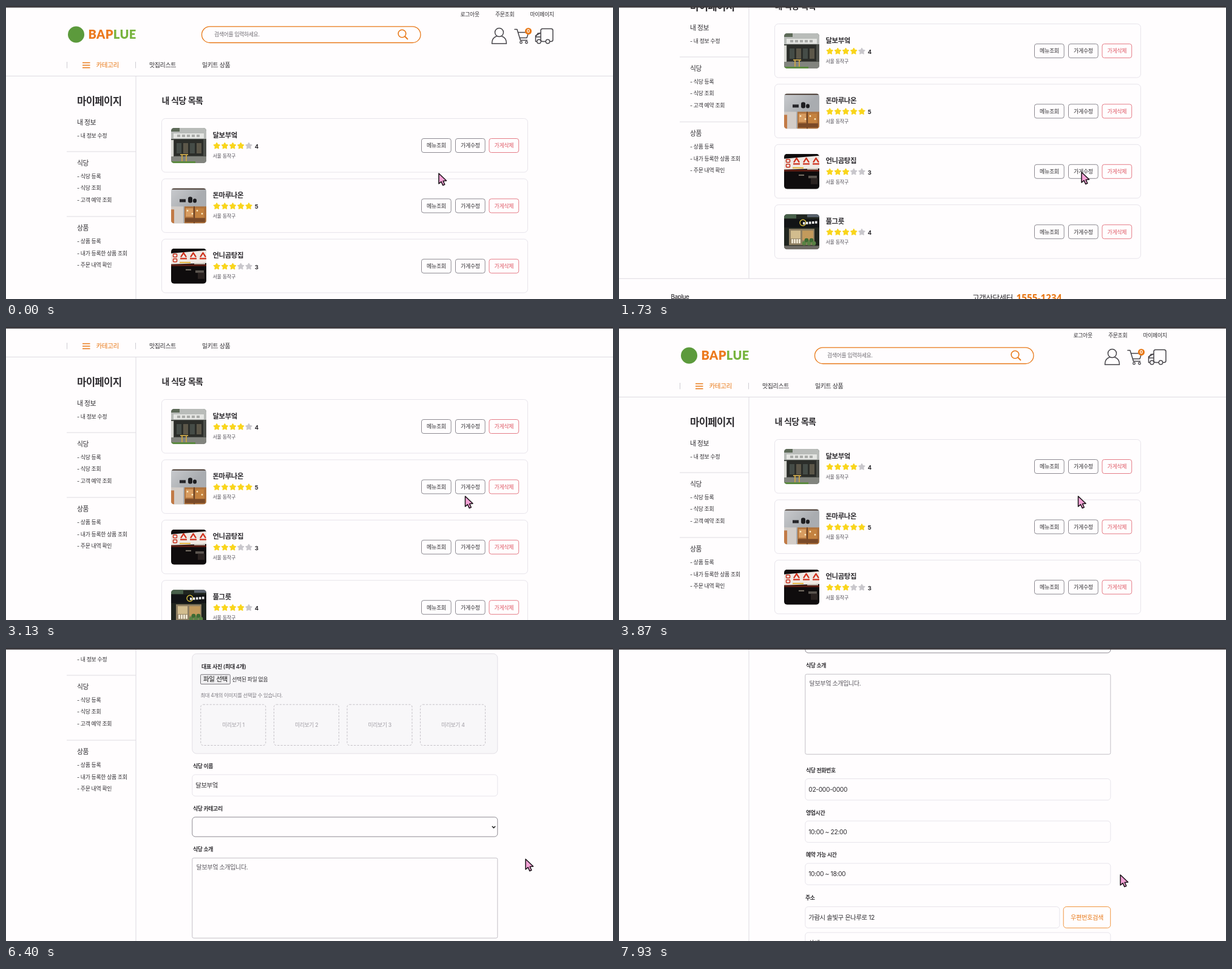
These frames come from a looping animation (1000 by 483 pixels, 8000 ms). An HTML page with a canvas:

```html
<!DOCTYPE html>
<html lang="ko">
<head>
<meta charset="utf-8">
<title>마이페이지</title>
<style>
  html, body { margin: 0; width: 100%; height: 100%; overflow: hidden; background: #fffdfe; }
  canvas { display: block; width: 100vw; height: 100vh; }
</style>
</head>
<body>
<canvas id="stage"></canvas>
<script>
const W = 1000, H = 483, LOOP = 8000, SWITCH = 5260;
const INK = '#2f2d31', ORANGE = '#e87817', RED = '#de5562', LINE = '#dddbe1', PALE = '#e7e4eb';
const EDGE = '#8d8a92', PAPER = '#fffdfe';
const FONT = 'Inter, "Noto Sans CJK KR", "Noto Sans CJK", sans-serif';

const canvas = document.getElementById('stage');
const ratio = window.devicePixelRatio || 1;
canvas.width = W * ratio;
canvas.height = H * ratio;
const c = canvas.getContext('2d');

// --- drawing helpers; y of a text is its optical centre ---
function text(s, x, y, size, color = INK, weight = 400, align = 'left') {
  c.font = `${weight} ${size}px ${FONT}`;
  c.letterSpacing = -0.04 * size + 'px';
  c.textAlign = align;
  c.fillStyle = color;
  c.fillText(s, x, y + size * 0.36);
}

function box(x, y, w, h, r, stroke, fill, lw = 1) {
  c.beginPath();
  c.roundRect(x, y, w, h, r);
  if (fill) { c.fillStyle = fill; c.fill(); }
  if (stroke) { c.strokeStyle = stroke; c.lineWidth = lw; c.stroke(); }
}

function line(points, color = LINE, lw = 1) {
  c.beginPath();
  points.forEach(([x, y], i) => i ? c.lineTo(x, y) : c.moveTo(x, y));
  c.strokeStyle = color;
  c.lineWidth = lw;
  c.stroke();
}

function rect(color, x, y, w, h) {
  c.fillStyle = color;
  c.fillRect(x, y, w, h);
}

function disc(x, y, r, fill, stroke, lw = 1) {
  c.beginPath();
  c.arc(x, y, r, 0, Math.PI * 2);
  if (fill) { c.fillStyle = fill; c.fill(); }
  if (stroke) { c.strokeStyle = stroke; c.lineWidth = lw; c.stroke(); }
}

function star(x, y, r, color) {
  c.beginPath();
  for (let i = 0; i < 10; i++) {
    const a = -Math.PI / 2 + i * Math.PI / 5, d = i % 2 ? r * 0.54 : r;
    c.lineTo(x + d * Math.cos(a), y + d * Math.sin(a));
  }
  c.closePath();
  c.fillStyle = c.strokeStyle = color;
  c.lineWidth = 1;
  c.lineJoin = 'round';
  c.fill();
  c.stroke();
}

// --- header ---
function icons() {
  const g = '#454348';
  c.lineCap = c.lineJoin = 'round';
  disc(812.5, 43.5, 7, null, g, 1.5);
  c.beginPath();
  c.moveTo(808, 50);
  c.bezierCurveTo(802, 52, 800.5, 57, 800.5, 62);
  c.lineTo(824.5, 62);
  c.bezierCurveTo(824.5, 57, 823, 52, 817, 50);
  c.stroke();

  line([[838, 38.5], [842, 38.5], [847.5, 56.5], [858.5, 56.5]], g, 1.5);
  line([[843.5, 43.5], [861, 43.5], [858, 52.5], [846.5, 52.5]], g, 1.5);
  disc(848.5, 60, 1.8, null, g, 1.3);
  disc(857.5, 60, 1.8, null, g, 1.3);
  disc(860.5, 41.5, 5.5, ORANGE);
  text('0', 860.4, 41.6, 8, '#fff', 700, 'center');

  line([[875, 58.5], [872.5, 58.5], [872.5, 49], [880, 44.5], [881, 44.5]], g, 1.5);
  box(881, 37.5, 20, 21, 3, g, PAPER, 1.5);
  line([[880.5, 45], [876, 45], [872.5, 51], [880.5, 51]], g, 1.3);
  disc(878, 58.5, 3.2, PAPER, g, 1.4);
  disc(892.5, 58.5, 3.2, PAPER, g, 1.4);
  c.lineCap = 'butt';
}

function header() {
  text('로그아웃', 748.5, 14, 8.9, INK, 500);
  text('주문조회', 806, 14, 8.9);
  text('마이페이지', 863.5, 14, 8.9);

  disc(115.5, 47, 13.5, '#5c9a3c');
  c.font = '900 20px Lato, "Open Sans", sans-serif';
  c.letterSpacing = '0.4px';
  c.textAlign = 'left';
  c.fillStyle = '#ec7a1e';
  c.fillText('BAP', 135.5, 54);
  const w = c.measureText('BAP').width;
  c.fillStyle = '#78b43e';
  c.fillText('LUE', 135.5 + w, 54);

  box(322.5, 33.8, 360.5, 26.7, 13.4, ORANGE, PAPER, 1.3);
  text('검색어를 입력하세요.', 343, 47, 8.9, '#6d6a70');
  disc(652.5, 45.5, 6.3, null, ORANGE, 1.6);
  line([[657, 50], [662, 55]], ORANGE, 1.8);
  icons();

  for (const x of [100.5, 213.5]) line([[x, 92], [x, 102.5]], '#cfccd2');
  for (const y of [93.5, 97.6, 101.7]) line([[126, y], [138.5, y]], ORANGE, 1.5);
  text('카테고리', 148.5, 97, 10.6, ORANGE, 500);
  text('맛집리스트', 236, 97, 10, INK, 500);
  text('밀키트 상품', 323, 97, 10, INK, 500);
  line([[0, 115.5], [W, 115.5]]);
}

// --- sidebar ---
const menu = [
  [192, '내 정보', '내 정보 수정'],
  [259, '식당', '식당 등록', '식당 조회', '고객 예약 조회'],
  [366.5, '상품', '상품 등록', '내가 등록한 상품 조회', '주문 내역 확인']
];

function sidebar(bottom) {
  line([[214, 115.5], [214, bottom]]);
  text('마이페이지', 117, 157, 16.7, INK, 600);
  for (const [y, head, ...items] of menu) {
    text(head, 117, y, 10.8, INK, 500);
    items.forEach((s, i) => text('- ' + s, 117, y + 21.3 + i * 19.7, 8.9));
  }
  for (const y of [240, 347]) line([[100, y], [214, y]]);
}

// --- shop photos, 58 by 58, as flat shapes ---
function photoArcade() {
  rect('#4c4f4a', 0, 0, 58, 58);
  rect('#b9bcb9', 0, 0, 58, 18);
  rect('#5d6a58', 0, 0, 14, 6);
  rect('#e4e5e2', 4, 9, 50, 8);
  for (let i = 0; i < 5; i++) rect('#a9aba8', 10 + i * 8, 11, 5, 4);
  rect('#2b2d29', 5, 19, 48, 27);
  for (let i = 0; i < 4; i++) rect(i % 2 ? '#5c5749' : '#454c47', 9 + i * 11, 25, 8, 17);
  rect('#d8d8d2', 0, 20, 4, 28);
  rect('#82847e', 0, 47, 58, 11);
  rect('#c3a14a', 15, 43, 13, 2);
  rect('#c3a14a', 17, 45, 2, 10);
  rect('#c3a14a', 24, 45, 2, 10);
  rect('#5b8a3f', 0, 55, 40, 3);
}

function photoWindow() {
  const wall = c.createLinearGradient(0, 0, 30, 30);
  wall.addColorStop(0, '#c9cbce');
  wall.addColorStop(1, '#a9acb0');
  rect(wall, 0, 0, 58, 58);
  rect('#3a2a20', 0, 0, 58, 2);
  rect('#26262a', 14, 18, 10, 5);
  box(28, 14, 7, 10, 3, null, '#1d1d20');
  box(36, 17, 6, 7, 3, null, '#1d1d20');
  rect('#b0733c', 22, 30, 36, 28);
  rect('#d89c60', 24, 33, 12, 14);
  rect('#c4823f', 40, 33, 14, 18);
  rect('#6d4426', 37, 30, 2, 28);
  rect('#7a4a28', 23, 49, 33, 7);
  for (let i = 0; i < 4; i++) disc(27 + i * 8, 37 + i % 2 * 5, 1.3, '#fff0c8');
  rect('#d3cdc8', 0, 30, 20, 28);
  rect('#c27a46', 0, 35, 5, 23);
}

function photoNight() {
  rect('#0f0c0d', 0, 0, 58, 58);
  c.beginPath();
  c.moveTo(0, 8);
  c.lineTo(58, 3);
  c.lineTo(58, 24);
  c.lineTo(0, 26);
  c.fillStyle = '#efe9e4';
  c.fill();
  for (const y of [9, 17]) box(3.5, y, 6, 5, 1, '#c8321f', null, 1.6);
  for (let i = 0; i < 3; i++) {
    const x = 16 + i * 16;
    line([[x, 14], [x + 4.5, 7], [x + 9, 14]], '#d0301c', 2.2);
    line([[x - 1, 16.5], [x + 10, 16.5]], '#d0301c', 2.2);
  }
  rect('#e2b13a', 14, 22, 18, 2);
  rect('#5a1d14', 0, 26, 58, 3);
  rect('#c9c2b8', 38, 24, 18, 2);
  rect('#7d756a', 24, 34, 9, 2);
  rect('#5c5650', 40, 36, 14, 4);
  rect('#2a2220', 44, 40, 11, 10);
}

function photoGarden() {
  rect('#20251f', 0, 0, 58, 58);
  rect('#48604a', 0, 0, 20, 7);
  rect('#58616c', 38, 0, 20, 5);
  rect('#121416', 0, 8, 58, 14);
  disc(31, 14, 5, null, '#d6bd3c', 1.4);
  for (let i = 0; i < 5; i++) rect('#e9e9e9', 31 + i * 5, 13 - i * 0.4, 3.5, 4);
  rect('#8f8063', 8, 24, 42, 27);
  rect('#d2bd8e', 11, 27, 16, 13);
  rect('#c39a5c', 30, 27, 18, 16);
  for (let i = 0; i < 4; i++) rect('#eee6d2', 12 + i * 4, 41, 3, 7);
  for (let i = 0; i < 5; i++) disc(33 + i * 4, 48 - i % 2 * 5, 3.4, i % 2 ? '#3d6b34' : '#598244');
  rect('#6d6a64', 0, 52, 58, 6);
}

const shops = [
  ['달보부엌', 4, photoArcade],
  ['돈마루나온', 5, photoWindow],
  ['언니곰탕집', 3, photoNight],
  ['풀그릇', 4, photoGarden]
];

function button(x, y, label, color, border, fill) {
  box(x, y, 48.7, 23, 3.5, border, fill);
  text(label, x + 24.4, y + 11.7, 9, color, 500, 'center');
}

function shopCard([name, rating, photo], top, hover) {
  box(256.5, top, 603, 88.5, 6, PALE);
  c.save();
  c.translate(272, top + 15.5);
  c.beginPath();
  c.roundRect(0, 0, 58, 58, 5);
  c.clip();
  photo();
  c.restore();
  text(name, 340.5, top + 27, 11.5, INK, 600);
  for (let i = 0; i < 5; i++) star(347.2 + i * 13.2, top + 45.2, 5.6, i < rating ? '#f9d51b' : '#c9c7cc');
  text(rating, 409.7, top + 46, 9.6, INK, 700);
  text('서울 동작구', 340.5, top + 61.5, 8.1, '#55525a');
  button(684.5, top + 33, '메뉴조회', INK, EDGE);
  button(740.5, top + 33, '가게수정', INK, EDGE, hover && '#e7e5ea');
  button(796, top + 33, '가게삭제', RED, '#e57c87');
}

function footer() {
  const g = '#4b484f', s = 8.2;
  line([[0, 605.3], [W, 605.3]]);
  text('Baplue', 85.5, 635, 9.8, INK, 500);
  text('대표 : 김가온', 85.5, 648.5, s, g);
  text('사업자 등록번호 : 000-12-34567', 135, 648.5, s, g);
  text('통신판매업 신고 : 제2024-솔빛-1234호 본사 : 가람특별시 솔빛구 은내음동', 254, 648.5, s, g);
  text('고객센터 : 1555-1234', 85.5, 661.5, s, g);
  text('개인정보관리책임자 : 김가온', 169.5, 661.5, s, g);
  text('Copyright 2014. www.baplue.test All rights reserved.', 85.5, 675, s, g);
  text('고객상담센터', 582, 637, 12.7, INK, 500);
  c.font = '700 15.3px "Noto Sans", sans-serif';
  c.letterSpacing = '0px';
  c.fillStyle = ORANGE;
  c.fillText('1555-1234', 654.5, 642.5);
  text('평일 10:00 ~ 18:00 (점심시간 12:00 ~ 13:00)', 582, 657.5, 9.1, g);
  text('주말  ·  공휴일 휴무', 582, 670.5, 9, g);
}

function listPage(hover) {
  header();
  sidebar(605);
  text('내 식당 목록', 256.5, 156, 14.1, INK, 600);
  shops.forEach((shop, i) => shopCard(shop, 185.5 + i * 99.4, hover && i === 0));
  footer();
}

// --- edit form ---
function field(label, y, value) {
  text(label, 308, y, 8.9, INK, 600);
  box(306.8, y + 13.8, 503, 35.3, 5, PALE);
  text(value, 312.3, y + 31.5, 10.4);
}

function formPage() {
  header();
  sidebar(1400);
  text('식당 정보 수정', 256.5, 156, 14.1, INK, 600);

  box(306.8, 204.5, 503, 164.5, 7, '#e2dfe5', '#f8f7f9');
  text('대표 사진 (최대 4개)', 322, 225.5, 9.1, INK, 600);
  box(320.5, 238.8, 48.8, 15.7, 1.5, '#7a777d', '#efeef0');
  text('파일 선택', 325, 246.5, 10.6, '#111');
  text('선택된 파일 없음', 372.3, 247, 8.9);
  text('최대 4개의 이미지를 선택할 수 있습니다.', 320.5, 272.5, 8.4, '#7e7b82');
  c.setLineDash([3.2, 2.2]);
  for (let i = 0; i < 4; i++) box(320.8 + i * 120.6, 288.2, 107, 67.3, 4, '#c4c1c7');
  c.setLineDash([]);
  for (let i = 0; i < 4; i++) text('미리보기 ' + (i + 1), 374.5 + i * 120.6, 321.5, 8.8, '#a19ea5', 400, 'center');

  field('식당 이름', 390, '달보부엌');
  text('식당 카테고리', 308, 460, 8.9, INK, 600);
  box(306.8, 473.8, 503, 32.2, 5, EDGE);
  line([[800.8, 488.8], [803.5, 491.6], [806.2, 488.8]], '#222', 1.5);
  text('식당 소개', 308, 527, 8.9, INK, 600);
  box(306.8, 541.2, 503, 132, 2.5, '#c2bfc6');
  text('달보부엌 소개입니다.', 313.5, 556.7, 10.1, '#59565d');

  field('식당 전화번호', 699.7, '02-000-0000');
  field('영업시간', 769.3, '10:00 ~ 22:00');
  field('예약 가능 시간', 839.2, '10:00 ~ 18:00');
  text('주소', 307, 909.5, 8.9, INK, 600);
  box(306.8, 924.5, 419, 35, 5, PALE);
  text('가람시 솔빛구 은나루로 12', 312.3, 942, 10.4);
  box(732.2, 924.5, 77.5, 35, 5, '#f0963f');
  text('우편번호검색', 771, 942, 10.2, ORANGE, 500, 'center');
  box(306.8, 967, 503, 35, 5, PALE);
  text('상세', 312.3, 984.5, 10.4);
}

// --- motion ---
const NOTCH = 52.08, GLIDE = 160, MAX_LIST = 197;
const clamp = (v, lo, hi) => Math.min(hi, Math.max(lo, v));
const ease = u => { u = clamp(u, 0, 1); return u * u * (3 - 2 * u); };
const glide = (t, starts) => starts.reduce((n, s) => n + ease((t - s) / GLIDE), 0) * NOTCH;

function scrollAt(t) {
  if (t >= SWITCH) {
    return glide(t, [5850, 6040, 6180, 6292, 6800, 7080, 7290, 7510, 7680, 7846]);
  }
  const down = Math.min(MAX_LIST, glide(t, [1000, 1180, 1370, 1880]));
  return Math.max(0, down - glide(t, [2740, 2890, 3052, 3480]));
}

const path = [
  [0, 713, 276], [250, 713, 276], [900, 762, 274], [1900, 762, 274], [2470, 762, 275],
  [2900, 756.5, 279], [4250, 756.5, 279], [4850, 763, 230], [5300, 763, 230],
  [5800, 856, 348], [7100, 856, 348], [7800, 826, 374], [LOOP, 826, 374]
];

function pointerAt(t) {
  const i = path.findIndex(p => p[0] > t);
  const [t0, x0, y0] = path[i - 1], [t1, x1, y1] = path[i];
  const u = ease((t - t0) / (t1 - t0));
  return [x0 + (x1 - x0) * u, y0 + (y1 - y0) * u];
}

const ARROW = new Path2D('M0 0V17L4 13.6L6.8 19.6L9.8 18.2L7.1 12.4L12.6 12Z');
const HAND = new Path2D('M4.5 13V3Q4.5 1 6.4 1T8.3 3V9Q10 7.4 11.6 9.4Q13.4 8.2 14.6 10.4' +
  'Q17.4 9.6 17.4 12.6V17Q17 20 15.2 23.5H6.6Q4.6 19.5 0.9 15.5Q-0.2 13.4 1.6 12.6Q3 12.2 4.5 14Z');

function pointer(x, y, hand) {
  c.save();
  c.translate(x, y);
  c.lineJoin = 'round';
  c.lineWidth = 1.5;
  c.strokeStyle = '#1a1218';
  c.fillStyle = '#f4a3d6';
  const shape = hand ? HAND : ARROW;
  c.fill(shape);
  c.stroke(shape);
  if (hand) {
    for (const px of [8.3, 11.5, 14.5]) line([[px, 9.5], [px, 13]], '#1a1218', 1.1);
  }
  c.restore();
}

function draw(now) {
  const fps = 15 / 1000;
  const t = Math.floor((now % LOOP + 4) * fps) / fps % LOOP;
  const [x, y] = pointerAt(t);
  const hover = t > 4300 && t < SWITCH && y < 241.5;

  c.setTransform(ratio, 0, 0, ratio, 0, 0);
  rect(PAPER, 0, 0, W, H);
  c.save();
  c.translate(0, -Math.round(scrollAt(t)));
  if (t < SWITCH) listPage(hover); else formPage();
  c.restore();
  rect('#3b393d', 0, 0, W, 2.6);
  pointer(x, y, hover);
}

let start;
function tick(now) {
  start ??= now;
  draw(now - start);
  requestAnimationFrame(tick);
}
requestAnimationFrame(tick);
</script>
</body>
</html>
```
